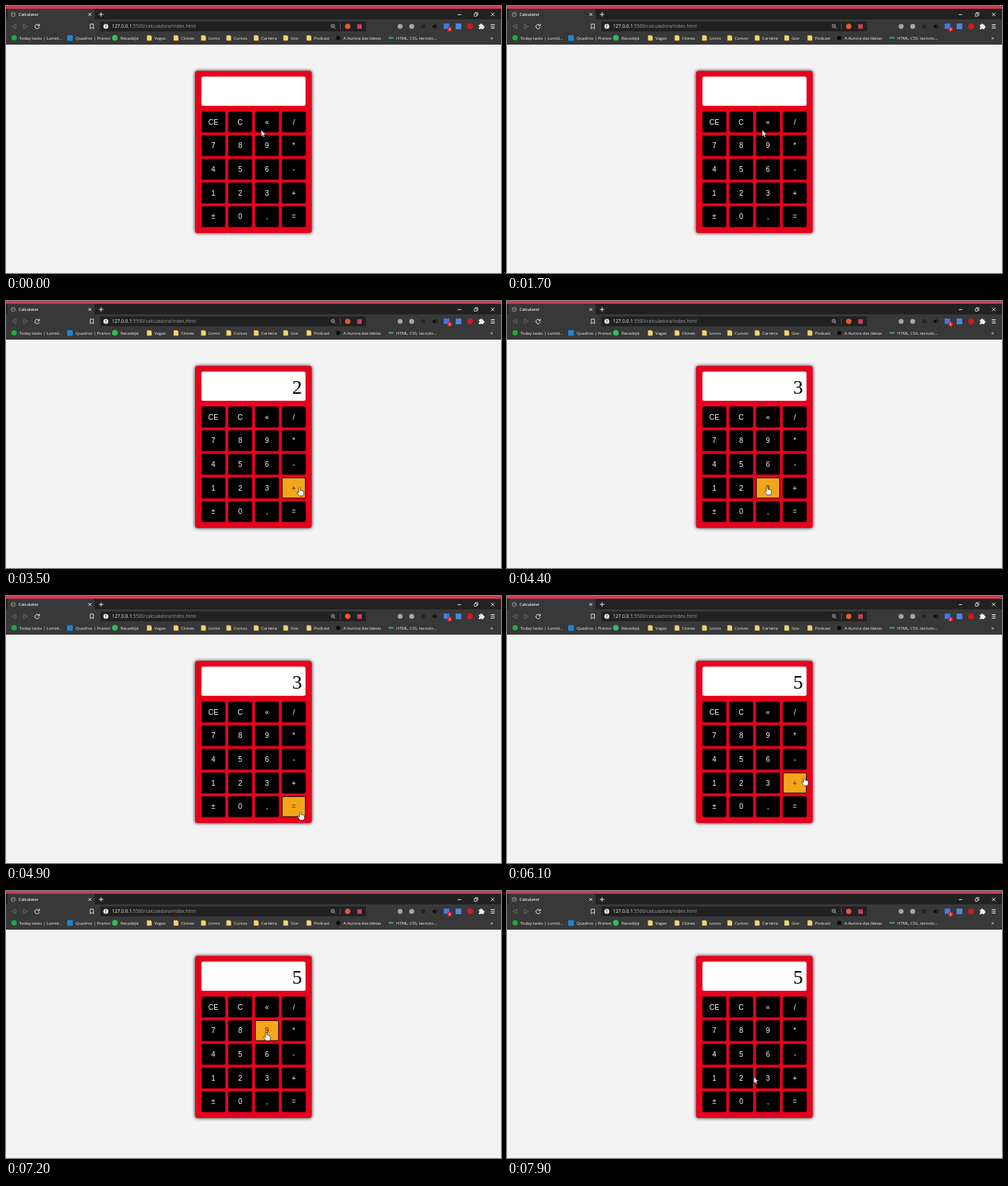
Write an HTML page that moves like this. It is 704 px wide and 380 px high and loops after 8 s.

```html
<!DOCTYPE html>
<html lang="pt">
<head>
<meta charset="utf-8">
<title>Calculator</title>
<style>
  html, body { margin: 0; width: 100%; height: 100%; overflow: hidden; background: #f3f3f3; }
  svg { display: block; width: 704px; height: 380px; }
  .ui { font-family: "Open Sans", "Noto Sans", sans-serif; font-size: 5.95px; fill: #f4f4f4; }
  .key { font: 10.2px "Liberation Sans", Arial, sans-serif; text-anchor: middle; fill: #fff; }
  .key rect { fill: #000; stroke: #000; }
  .key.hover rect { fill: #f2a71b; }
  .key.hover text { fill: #33260a; }
  #value { font: 28px "Liberation Serif", Times, serif; text-anchor: end; fill: #000; }
  .line { fill: none; stroke: #eee; stroke-width: 1; }
  .body { filter: drop-shadow(0 0 2.6px rgba(0, 0, 0, .95)); }
</style>
</head>
<body>
<svg viewBox="0 0 704 380">
  <rect width="704" height="380" fill="#f3f3f3"/>

  <!-- window frame and tab -->
  <rect width="704" height="20" fill="#212121"/>
  <rect width="704" height="4" fill="#c93d55"/>
  <path d="M2 20V6q0-2 2-2H124q2 0 2 2V20z" fill="#383838"/>
  <rect y="19" width="704" height="36" fill="#383838"/>
  <g class="line" stroke-width=".7" style="stroke:#8d8d8d">
    <circle cx="10.3" cy="12" r="3"/>
    <path d="M8 10.5l2 1 -1 2M12 9.6l-.6 2 1.4 1.2" stroke-width=".8"/>
  </g>
  <text class="ui" x="18" y="14" font-weight="600" style="font-size:5.75px">Calculator</text>
  <g class="line">
    <path d="M117.3 10l4 4m0-4l-4 4M132 12h6.4M135.2 8.8v6.4"/>
    <path d="M642.5 12.3h5M689.8 9.6l4.8 4.8m0-4.8l-4.8 4.8"/>
    <path d="M666 10.8h3.7v3.7H666zM667.5 10.8V9.3h3.6v3.7h-1.4" stroke-width=".8"/>
  </g>

  <!-- navigation bar -->
  <g class="line">
    <path d="M14 25.8v6.4L8.6 29zM25 25.8v6.4l5.4-3.2z" style="stroke:#686868"/>
    <path d="M46.6 27.2A3.1 3.1 0 1 0 47.3 30M47.4 25.5v2.6h-2.6"/>
    <path d="M119.8 25.8h4.6v6.6l-2.3-1.9 -2.3 1.9z" stroke-width=".9"/>
  </g>
  <rect x="134" y="22" width="378" height="14" rx="2" fill="#212121"/>
  <circle cx="142" cy="29" r="3.5" fill="#eee"/>
  <path d="M142 26.8v2.6M142 30.3v1" stroke="#212121"/>
  <text class="ui" x="150.7" y="31.3" style="font-size:6.7px">127.0.0.1<tspan fill="#a0a0a0">:5500/calculadora/index.html</tspan></text>
  <g class="line" style="stroke:#aaa" stroke-width=".8">
    <circle cx="464.8" cy="28.4" r="2.4"/><path d="M466.6 30.3l2 2M463.6 28.4h2.4"/>
  </g>
  <path d="M475.5 24.5v9" stroke="#555"/>
  <circle cx="486" cy="29" r="3.8" fill="#f0562b"/>
  <rect x="499.5" y="26" width="6.5" height="6.5" fill="#c8405c"/>

  <!-- extensions -->
  <circle cx="560.5" cy="29" r="3.5" fill="#a5a5a5"/>
  <circle cx="577" cy="29" r="3.5" fill="#a8a8a8"/>
  <circle cx="593.5" cy="29" r="3" fill="#252525"/>
  <path d="M606.5 27.6h2l2.6-2.4v7.6l-2.6-2.4h-2z" fill="#0c0c0c"/>
  <path d="M612.5 27q1.8 2 0 4" fill="none" stroke="#0c0c0c"/>
  <rect x="622.5" y="25" width="8" height="7.5" fill="#3f7be8"/>
  <rect x="628" y="30" width="6" height="6" rx="1" fill="#e2202b"/>
  <text class="ui" x="629.6" y="35" style="font-size:5px">6</text>
  <rect x="639.5" y="25" width="8" height="8" fill="#4f86e4"/>
  <circle cx="660" cy="29" r="4.2" fill="#d8141f"/>
  <path d="M672.5 26.6h2a1.3 1.3 0 1 1 2.5 0h2v2a1.3 1.3 0 1 1 0 2.5v2h-2a1.3 1.3 0 0 0-2.5 0h-2v-2a1.3 1.3 0 0 0 0-2.5z" fill="#eee"/>
  <path class="line" d="M689.5 26.5h5.5M689.5 29h5.5M689.5 31.5h5.5"/>

  <!-- bookmarks -->
  <g id="marks" class="ui">
    <circle cx="11.5" cy="45.3" r="3.8" fill="#1faa3c"/>
    <rect x="87" y="41.5" width="8" height="8" rx="1" fill="#2684cc"/>
    <circle cx="154.8" cy="45.3" r="4" fill="#2fbf57"/>
    <circle cx="472.5" cy="45.5" r="3" fill="#090909"/>
    <rect x="544" y="44" width="7" height="2.6" fill="#3d8f96"/>
    <text x="688.8" y="47.6" style="font-size:8px">»</text>
  </g>

  <!-- calculator -->
  <rect class="body" x="269" y="92.5" width="165.7" height="230.5" rx="3" fill="#e6001d"/>
  <rect x="278" y="100.6" width="148" height="41.4" rx="2.5" fill="#fff"/>
  <text id="value" x="421" y="132"></text>
  <g id="keys"></g>

  <path id="arrow" d="M0 0v9l2-1.8 1.4 3.1 1.5-.7L3.5 6.6h2.8z" fill="#fff" stroke="#222" stroke-width=".6"/>
  <path id="hand" d="M-1 .8Q0-.8 1 .8V4.2q1-.8 1.8.3 1-.6 1.7.5 1.4-.3 1.5 1V8.8L5 12H-.4L-3.4 7.6q-.6-1.5.7-1.5L-1 7.6z" fill="#fff" stroke="#222" stroke-width=".75"/>
</svg>
<script>
const LOOP = 8000, STEP = 100;
const $ = id => document.getElementById(id);

function add(parent, tag, attrs, text = "") {
  const el = document.createElementNS("http://www.w3.org/2000/svg", tag);
  for (const k in attrs) el.setAttribute(k, attrs[k]);
  el.textContent = text;
  parent.append(el);
  return el;
}

const links = [
  [19, "Today tasks | Lumid..."], [99, "Quadros | Pranvo"], [163, "RecadoJá"],
  [480, "A Aurora das Ideias"], [555, "HTML, CSS, tecnolo..."]
];
const folders = [
  [211, "Vagas"], [249, "Clones"], [288, "Livros"], [324, "Cursos"],
  [363, "Carreira"], [405, "Gov"], [438, "Podcast"]
];
for (const [x, label] of [...links, ...folders]) add($("marks"), "text", { x, y: 47.5 }, label);
for (const [x] of folders) add($("marks"), "path", { d: `M${x - 10.5} 41.8h5.5v1h1.2v6.4h-6.7z`, fill: "#f5d36c" });

const KEY_W = 34, KEY_H = 29.6;
const keys = ["CE", "C", "«", "/", ..."789*456-123+±0,="].map((label, i) => {
  const x = 277.9 + i % 4 * 38.15, y = 150.2 + Math.floor(i / 4) * 33.7;
  const el = add($("keys"), "g", { class: "key" });
  add(el, "rect", { x: x + .5, y: y + .5, width: KEY_W - 1, height: KEY_H - 1, rx: 1.5 });
  add(el, "text", { x: x + KEY_W / 2, y: y + 18.4 }, label);
  return { el, x, y };
});

// pointer path: time, x, y
const path = [
  [0, 363, 176.5], [2100, 363, 176.5], [2400, 366, 215], [2700, 363.5, 261.5],
  [2900, 336, 265], [3100, 336, 265], [3500, 417.5, 265.5], [3900, 417.5, 265.5],
  [4200, 370, 264], [4400, 370, 264], [4800, 418.5, 307], [5800, 418.5, 307],
  [6100, 422.5, 258], [6300, 422.5, 258], [6700, 370, 201], [7600, 370, 201], [7900, 351, 264.5]
];
const values = [[0, ""], [3000, "2"], [4400, "3"], [5200, "5"]];
const HOVER_FROM = 2200;

function pointer(t) {
  const i = path.findIndex(p => p[0] >= t);
  if (i < 1) return path[0].slice(1);
  const [t0, x0, y0] = path[i - 1], [t1, x1, y1] = path[i];
  const k = (t - t0) / (t1 - t0);
  return [x0 + (x1 - x0) * k, y0 + (y1 - y0) * k];
}

function draw(t) {
  const [x, y] = pointer(t);
  let over = false;
  for (const k of keys) {
    const hit = t >= HOVER_FROM && x >= k.x && x < k.x + KEY_W && y >= k.y && y < k.y + KEY_H;
    k.el.classList.toggle("hover", hit);
    over = over || hit;
  }
  for (const id of ["arrow", "hand"]) {
    $(id).setAttribute("transform", `translate(${x} ${y})`);
    $(id).style.display = (id === "hand") === over ? "" : "none";
  }
  $("value").textContent = values.filter(v => v[0] <= t).pop()[1];
}

const start = performance.now();
function tick() {
  const t = (performance.now() - start) % LOOP;
  draw(Math.floor(t / STEP) * STEP);
  requestAnimationFrame(tick);
}
tick();
</script>
</body>
</html>
```
